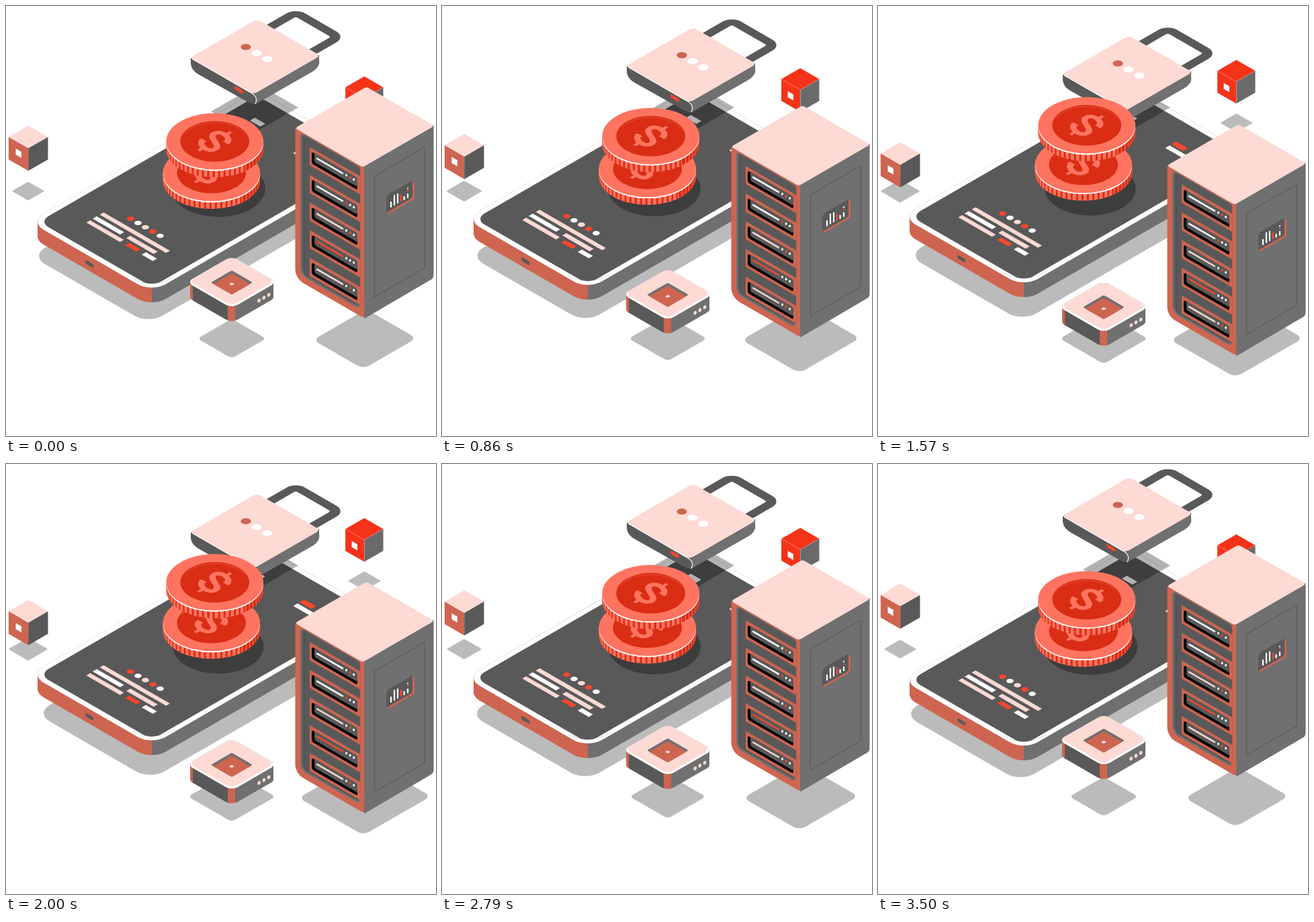
Recreate the animation shown at these times as an HTML page with a canvas. Size 640 by 640 pixels, loop 3570 ms.

```html
<!DOCTYPE html>
<html lang="en">
<head>
<meta charset="utf-8">
<title>Isometric devices</title>
<style>
html, body { margin: 0; width: 100%; height: 100%; overflow: hidden; background: #fff; }
canvas { display: block; width: 640px; height: 640px; }
</style>
</head>
<body>
<canvas id="stage"></canvas>
<script>
(() => {
const canvas = document.getElementById('stage');
const ctx = canvas.getContext('2d');
const dpr = window.devicePixelRatio || 1;
canvas.width = canvas.height = 640 * dpr;

const LOOP = 3570, STEPS = 50;
const PINK = '#fddad4', SALMON = '#ce6551', DARK = '#595959', MID = '#707070';
const RED = '#f8472c', CUBE = '#f53319', COIN = '#ff7460', DEEP = '#d92d14', WHITE = '#fff';
const SHADE = 'rgba(0,0,0,.265)';
const C = Math.sqrt(3) / 2;

// Rounded rectangle on one of the three isometric planes.
const plane = (a, b, c, d) => (x, y, w, h, r, color, line) => {
  ctx.save();
  ctx.transform(a, b, c, d, x, y);
  ctx.beginPath();
  ctx.roundRect(0, 0, w, h, r);
  if (line) {
    ctx.lineWidth = line;
    ctx.strokeStyle = color;
    ctx.stroke();
  } else {
    ctx.fillStyle = color;
    ctx.fill();
  }
  ctx.restore();
};
const flat = plane(C, 0.5, C, -0.5);
const leftFace = plane(C, 0.5, 0, 1);
const rightFace = plane(C, -0.5, 0, 1);

function at(dx, dy, draw) {
  ctx.save();
  ctx.translate(dx, dy);
  draw();
  ctx.restore();
}

function fillPath(d, color) {
  ctx.fillStyle = color;
  ctx.fill(new Path2D(d));
}

function strokePath(d, color, width, cap = 'butt') {
  ctx.strokeStyle = color;
  ctx.lineWidth = width;
  ctx.lineCap = cap;
  ctx.stroke(new Path2D(d));
}

function oval(x, y, rx, ry, color, tilt = 0) {
  ctx.beginPath();
  ctx.ellipse(x, y, rx, ry, tilt, 0, 7);
  ctx.fillStyle = color;
  ctx.fill();
}

function shadow(cx, cy, half, r, skew = 0) {
  const x = half + 0.507 * r, edge = x / C;
  flat(cx - x, cy - skew / 2, edge + skew / 2, edge - skew / 2, r, SHADE);
}

// Sides of a rounded slab, coloured in vertical bands [startX, color].
function sides(x, y, w, h, r, depth, bands) {
  bands.forEach(([x0, color], i) => {
    const x1 = i + 1 < bands.length ? bands[i + 1][0] : 640;
    ctx.save();
    ctx.beginPath();
    ctx.rect(x0, 0, x1 - x0, 640);
    ctx.clip();
    for (let d = depth; d >= 0; d--) flat(x, y + d, w, h, r, color);
    ctx.restore();
  });
}

function cube(x, y, w, h, lid, near, far) {
  const s = w / 2, k = s * 0.577;
  fillPath(`M${x} ${y}l${s} ${k}l${-s} ${k}l${-s} ${-k}z`, lid);
  fillPath(`M${x - s} ${y + k}l${s} ${k}v${h}l${-s} ${-k}z`, near);
  fillPath(`M${x} ${y + 2 * k}l${s} ${-k}v${h}l${-s} ${k}z`, far);
  leftFace(x - 18.7, y + 34.3, 9.6, 9, 0, WHITE);
}

function phone() {
  sides(35, 321, 210, 391, 24, 22, [[0, SALMON], [217, MID]]);
  flat(35, 321, 210, 391, 24, WHITE);
  strokePath('M188 405Q217 422 250 403', '#c4c4c4', 0.7);
  flat(49, 321, 194, 375, 16, DARK);
  leftFace(118, 377.5, 14.2, 5.6, 2.8, DARK);
  flat(139.5, 310.5, 114, 6.7, 0, PINK);
  flat(129, 316.5, 47, 7, 0, WHITE);
  flat(179, 345.5, 47, 7, 0, PINK);
  flat(119.5, 322.3, 58, 6.6, 0, PINK);
  flat(177.5, 356, 19, 7, 0, RED);
  flat(202, 370, 19, 7.2, 0, WHITE);
  [RED, WHITE, PINK, RED, WHITE].forEach((c, i) =>
    oval(185.5 + 11 * i, 316.6 + 6.35 * i, 5.3, 3.3, c));
  flat(363, 170.5, 18, 8.5, 0, WHITE);
  flat(427.5, 219, 40, 7.5, 0, WHITE);
  flat(437, 213.5, 20, 8, 0, RED);
}

function dollar() {
  ctx.save();
  ctx.transform(C, 0.5, -C, 0.5, 0, 0);
  strokePath('M12-9C10-20-12-23-12-11C-12 1 12-1 12 11C12 23-10 20-12 9', COIN, 7.5);
  strokePath('M7-9.5H16M-16 9.5H-7', COIN, 5);
  strokePath('M0-18V-28M0 18V28', COIN, 4.5);
  ctx.restore();
}

function coin(cx, cy) {
  const rx = 72.3, ry = 42, depth = 11.5, step = Math.PI / 28;
  at(cx, cy, () => {
    oval(0, depth, rx, ry, COIN);
    ctx.fillRect(-rx, 0, 2 * rx, depth);
    ctx.fillStyle = DEEP;
    for (let i = 0; i < 28; i++) {
      const a = i * step, b = a + step * (a < 0.85 ? 0.78 : 0.38);
      const [p, q] = [a, b].map(v => [rx * Math.cos(v), ry * Math.sin(v)]);
      ctx.beginPath();
      ctx.moveTo(...p);
      ctx.lineTo(...q);
      ctx.lineTo(q[0], q[1] + depth);
      ctx.lineTo(p[0], p[1] + depth);
      ctx.fill();
    }
    oval(0, 1.9, rx, ry, WHITE);
    oval(0, 0, rx, ry, COIN);
    oval(0, 0, 51.3, 30.2, DEEP);
    ctx.beginPath();
    ctx.ellipse(0, 1.6, 50, 29.4, 0, 3.6, 5.8);
    ctx.strokeStyle = '#ec5a42';
    ctx.lineWidth = 0.8;
    ctx.stroke();
    dollar();
  });
}

function lock() {
  flat(373.3, 43, 73, 67, 9.5, DARK, 13);
  fillPath('M275 78V86Q276 96 287 102L360 143Q368 147 372 145.5L457 97Q466 91 466 84V73Z', DARK);
  fillPath('M370 131L465 75Q467 82 466 86Q464 92 457 97L372 145.5Q374 138 370 131Z', MID);
  flat(274, 77, 109, 115, 6, PINK);
  strokePath('M277 78.7L362 127.8Q372 132 372.6 139Q372.6 143 371 146', WHITE, 1.2);
  leftFace(340, 118.5, 15.2, 5.2, 2.6, RED);
  [SALMON, WHITE, WHITE].forEach((c, i) => oval(357 + 16 * i, 61 + 9 * i, 7.6, 4.5, c));
}

function router() {
  sides(269, 411, 77.4, 77.4, 10, 22,
    [[0, SALMON], [278, DARK], [330.5, SALMON], [341.5, MID]]);
  flat(269, 411, 77.4, 77.4, 10, WHITE);
  flat(272.5, 409.5, 73.3, 73.3, 8, PINK);
  flat(305, 411.5, 35.8, 35.8, 2, MID);
  flat(308.5, 413.7, 31.8, 31.8, 1, SALMON);
  flat(332, 413.8, 4.6, 4.6, 0, PINK);
  for (let i = 0; i < 3; i++) oval(376.7 + 7.2 * i, 438.4 - 4.2 * i, 2.2, 3, PINK, 0.4);
}

function slot(y, line, dots) {
  at(0, y, () => {
    leftFace(452, 0, 86.6, 27, 0, SALMON);
    leftFace(455, 7, 78.5, 17.5, 3, '#000');
    leftFace(459, 8.6, 74, 13.6, 3, DARK);
    strokePath('M463 17L501 39', line, 2.5, 'round');
    dots.forEach((c, i) => oval(506.5 + 5.6 * i, 41.8 + 3.2 * i, 1.5, 1.9, c));
  });
}

function server() {
  fillPath('M531 237L636.5 177V400Q636.5 404.5 633 407L533 465.5Z', MID);
  leftFace(430.5, 180, 118.5, 225.5, [4, 0, 4, 13], SALMON);
  flat(430, 181.7, 116.5, 123, 4, PINK);
  leftFace(438, 188, 103, 212, [6, 4, 8, 10], MID);
  leftFace(440.5, 190.5, 100, 208, [5, 4, 8, 9], DARK);
  strokePath('M444.5 196V400', '#505050', 1);
  const lines = [WHITE, WHITE, PINK, RED, PINK];
  const dots = [
    [WHITE, RED, WHITE], [RED, WHITE, WHITE], [WHITE, RED, WHITE],
    [WHITE, WHITE, WHITE], [WHITE, RED, WHITE]
  ];
  lines.forEach((c, i) => slot(210 + 41.2 * i, c, dots[i]));
  rightFace(548.5, 253, 86, 180, 0, DARK, 1.2);
  rightFace(567, 283.5, 47, 27, 4, SALMON);
  rightFace(566, 282, 45, 26, [6, 2, 4, 1], DARK);
  [[573, 292, 299], [578, 282, 296], [583, 280, 293], [588, 282, 290, RED],
    [592.6, 284, 288], [598, 280, 285]].forEach(([x, a, b, c = WHITE]) =>
    strokePath(`M${x} ${a}V${b}`, c, 2.2, 'round'));
  oval(598, 271.6, 1.1, 1.2, WHITE);
  oval(598, 275.3, 1.1, 1.2, RED);
}

function draw(step) {
  const p = (1 - Math.cos((step + 0.27) / STEPS * 2 * Math.PI)) / 2;
  const lift = ((1 + Math.cos((step - 25.9) / STEPS * 2 * Math.PI)) / 2) ** 1.35;
  ctx.setTransform(dpr, 0, 0, dpr, 0, 0);
  ctx.fillStyle = WHITE;
  ctx.fillRect(0, 0, 640, 640);

  flat(37 + 7.2 * p, 372 - p, 202 - 5 * p, 391, 24, SHADE);
  shadow(33, 275.6, 23.5 + 5.5 * p, 1.5);
  shadow(533.5, 174, 29 - 5.5 * p, 1.5);
  shadow(336, 495, 48 + 14.7 * p, 6);
  shadow(534, 494.5, 72 + 22.3 * p, 10, -5);

  at(0, -8 * p, phone);
  flat(305, 157, 69, 81, 0, 'rgba(0,0,0,.3)');
  oval(316, 272, 70 - 2.5 * p, 42 - 2 * p, '#3d3d3d');
  at(0, 25.2 * p, lock);
  coin(305.8, 248.5 - 12.5 * p);
  coin(310.7, 201.5 - 26 * lift);

  at(0, 25.4 * p, () => cube(33.2, 178, 58.6, 33.5, PINK, SALMON, DARK));
  at(0, -25.4 * p, () => {
    cube(533.3, 104.8, 56.4, 32.5, CUBE, CUBE, '#6a6a6a');
    strokePath('M505.1 121l28.2 16.3l28.2-16.3M533.3 137.3v32.5', 'rgba(255,255,255,.35)', 0.6);
  });
  at(0, 57.5 * p, server);
  at(0, 37.8 * p, router);
}

function frame() {
  const t = (performance.now() + 6) % LOOP;
  draw(Math.floor(t / (LOOP / STEPS)));
  requestAnimationFrame(frame);
}
frame();
})();
</script>
</body>
</html>
```
